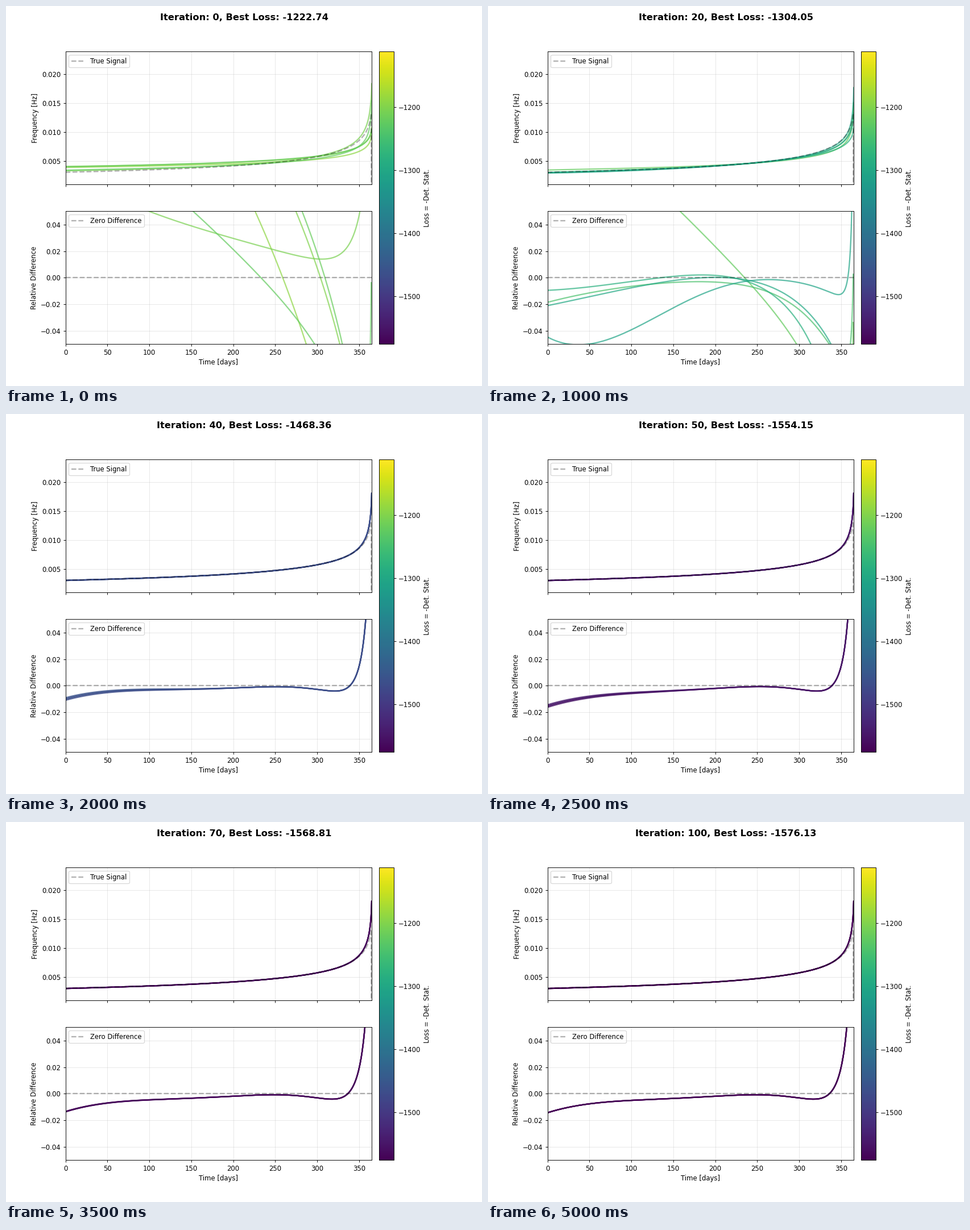
These frames come from a looping animation (837 px wide and 669 px high, 5.5 s). A matplotlib script:

```python
import numpy as np
import matplotlib.pyplot as plt
from matplotlib.animation import FuncAnimation
from matplotlib.cm import ScalarMappable
from matplotlib.colors import Normalize

DPI = 83.7
WIDTH, HEIGHT = 837 + 1e-6, 669 + 1e-6  # slack against truncation
T_PLUNGE = 365.3
T_CUT = 364.4
POPULATION = 5

plt.rcParams["font.family"] = "DejaVu Sans"


def phase(t):
    """Chirp coordinate: 0 at the start, close to 1 at the plunge."""
    return 1 - (1 - np.asarray(t, float) / T_PLUNGE) ** 0.375


days = 365 * (1 - (1 - np.linspace(0, 1, 700)) ** 3)
u = phase(days)
before = days <= T_CUT


def through(*points):
    """Polynomial in the chirp coordinate through (day, value) points."""
    t, y = np.array(points, float).T
    return np.polyval(np.polyfit(phase(t), y, len(y) - 1), u)


def settled(start, delay):
    """Relative difference of a nearly converged candidate."""
    return through((0, start), (140, .27 * start), (230, -.001),
                   (312 + 2 * delay, -.004), (336 + delay, 0),
                   (356.7 + .4 * delay, .05), (365, .25))


def converged(step, best, start):
    """A population that tightens with each step; the best comes last."""
    spread = 0.4 ** max(step - 1, 0)
    offsets = 0.001 * spread * np.linspace(1, -1, POPULATION)
    losses = best + 3 * spread * np.arange(POPULATION)[::-1]
    return [(loss, settled(start + d, 3 * spread))
            for loss, d in zip(losses, offsets)]


# 1/f of the signal is close to a cubic in the chirp coordinate.
signal = 1 / through((0, 1 / .0031), (250, 1 / .00478),
                     (350, 1 / .0086), (T_CUT, 1 / .0133))

stuck = through((0, .126), (158, .05), (235, 0), (297, -.05),
                (345, -.115), (T_CUT, -.033))
leader = through((0, -.0038), (140, -.003), (260, -.0045), (317, 0),
                 (351, .05), (365, .33))

# Each generation: best loss and its (loss, relative difference) members.
generations = [
    (-1222.74, [
        (-1190, through((0, .27), (226, .05), (287, -.05), (365, -.33))),
        (-1200, through((0, .32), (274.6, .05), (327, -.05))),
        (-1206, through((0, .08), (181, .033), (303, .014), (351, .05),
                        (365, .27))),
        (-1219, through((0, .31), (282, .05), (330, -.05))),
        (-1222.74, through((0, .116), (152, .05), (233, 0), (297, -.05),
                           (345, -.11), (T_CUT, -.003))),
    ]),
    (-1231.17, [
        (-1212, through((0, -.025), (120, -.0233), (200, -.0165), (293, 0),
                        (342, .0165), (363, .05))),
        (-1218, through((0, -.0035), (115, -.008), (226, 0), (329, .05),
                        (365, .3))),
        (-1222.74, stuck),
        (-1226, through((0, -.067), (170, -.05), (284, 0), (323, .05))),
        (-1231.17, through((0, -.18), (208, -.05), (262, 0), (301, .05),
                           (365, .59))),
    ]),
    (-1304.05, [
        (-1222.74, stuck),
        (-1245, through((0, -.0185), (185, -.003), (250, -.008),
                        (336, -.05), (361, -.05), (T_CUT, .003))),
        (-1282, through((0, -.0095), (160, .0015), (240, -.0033),
                        (314, -.05), (365, -.25))),
        (-1298, through((0, -.021), (185, 0), (250, -.0035), (338, -.05),
                        (365, -.08))),
        (-1304.05, through((26, -.05), (200, -.0085), (270, -.0015),
                           (300, -.0037), (344, -.0125), (358, 0),
                           (362.7, .05))),
    ]),
    (-1355.77, [
        (-1308, through((0, .022), (150, .011), (224, 0), (300, -.021),
                        (337, -.0312), (358.3, 0), (365, .15))),
        *[(-1355.77 + 2 * k, leader + 1e-4 * k) for k in (3, 2, 1, 0)],
    ]),
]

best_losses = [-1468.36, -1554.15, -1563.42, -1568.81,
               -1572.57, -1574.92, -1576.13]
starts = [-.0100, -.0153, -.0142, -.0135, -.0138, -.0141, -.0143]
for step, (best, start) in enumerate(zip(best_losses, starts)):
    generations.append((best, converged(step, best, start)))

fig, (top, bottom) = plt.subplots(
    2, 1, sharex=True, figsize=(WIDTH / DPI, HEIGHT / DPI), dpi=DPI)
title = fig.suptitle("", fontsize=14, fontweight="bold")

norm = Normalize(best_losses[-1], -1111.7)
scale = ScalarMappable(norm, "viridis")
scale.set_array([])
fig.colorbar(scale, ax=[top, bottom], pad=0.02, label="Loss = -Det. Stat.")

dashed = dict(color="k", ls="--", lw=2, alpha=0.3, zorder=3)
top.plot(np.append(days[before], T_CUT + .02), np.append(signal[before], 0),
         label="True Signal", **dashed)
bottom.axhline(0, label="Zero Difference", **dashed)

top.set(ylabel="Frequency [Hz]", xlim=(0, 365), ylim=(.00097, .02394))
bottom.set(xlabel="Time [days]", ylabel="Relative Difference",
           ylim=(-.05, .05))
for ax in (top, bottom):
    ax.grid(alpha=0.3)
    ax.legend(loc="upper left")


def make_lines(ax):
    return [ax.plot([], [], lw=2, alpha=0.7, zorder=2)[0]
            for _ in range(POPULATION)]


freq_lines, diff_lines = make_lines(top), make_lines(bottom)


def draw(i):
    best, members = generations[i]
    title.set_text(f"Iteration: {10 * i}, Best Loss: {best:.2f}")
    for f_line, d_line, (loss, diff) in zip(freq_lines, diff_lines, members):
        color = scale.cmap(norm(loss))
        f_line.set_data(days, signal * (1 + diff))
        d_line.set_data(days[before], diff[before])
        f_line.set_color(color)
        d_line.set_color(color)
    return [title, *freq_lines, *diff_lines]


anim = FuncAnimation(fig, draw, frames=len(generations), interval=500,
                     init_func=lambda: draw(0), repeat=True, repeat_delay=0,
                     blit=False)
plt.show()
```
